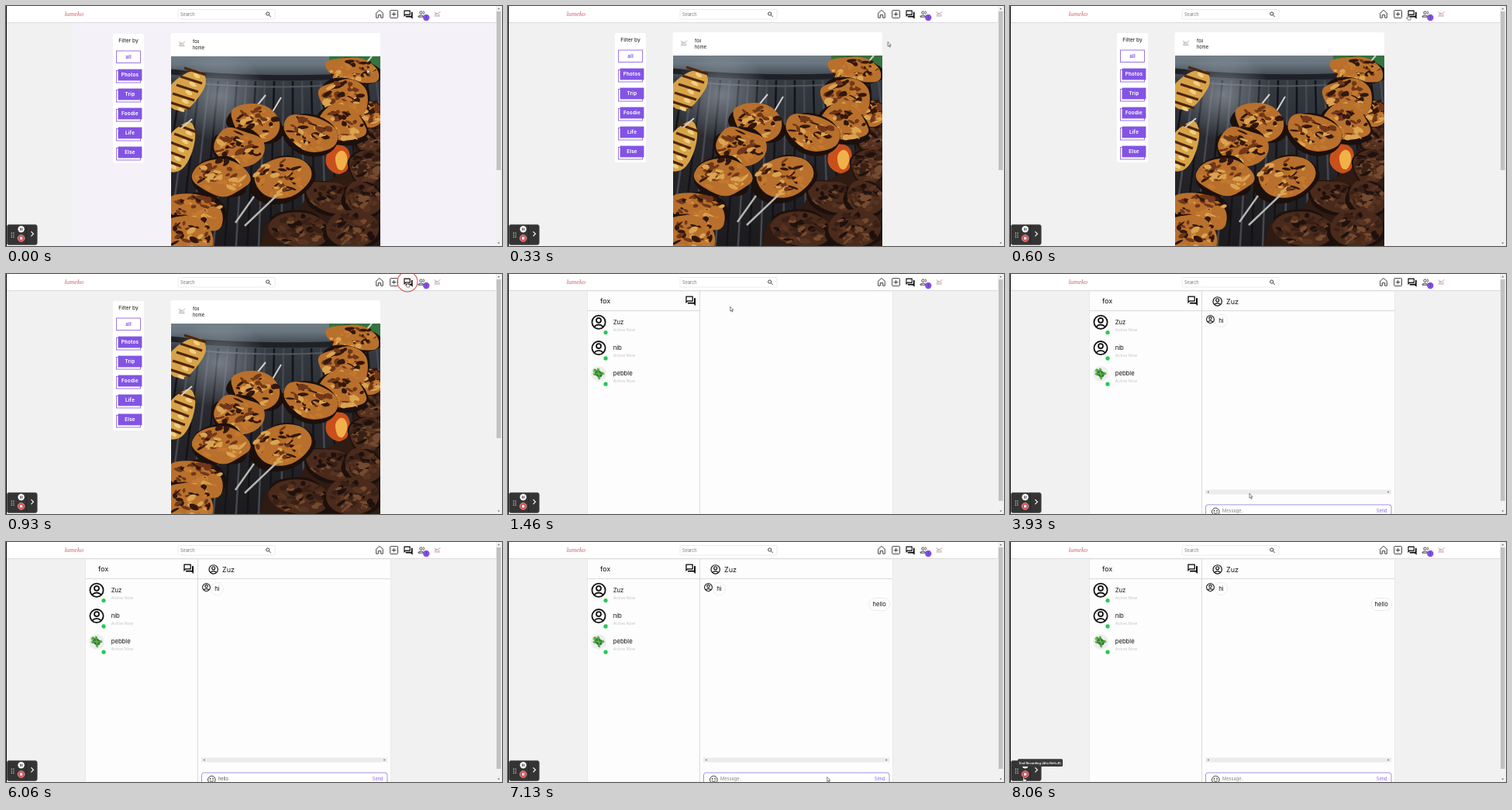
Write an HTML page that moves like this. It is 640x310 px and loops after 8.13 s.

```html
<!DOCTYPE html>
<html lang="en">
<head>
<meta charset="utf-8">
<title>Photo feed and chat</title>
<style>
html, body { margin: 0; width: 100%; height: 100%; overflow: hidden; background: #f1f1f1; }
svg { display: block; width: 640px; height: 310px; }
text { font-family: Inter, "Open Sans", sans-serif; fill: #111; }
.ui { font-family: Roboto, sans-serif; }
.line { fill: none; stroke: #222; stroke-width: .85; }
.b { font-weight: 700; }
</style>
</head>
<body>
<svg id="stage" viewBox="0 0 640 310">
  <defs>
    <linearGradient id="smoke" x1="0" y1="0" x2="0" y2="1">
      <stop offset="0" stop-color="#74828c"/><stop offset=".07" stop-color="#69757f"/>
      <stop offset=".15" stop-color="#353b43"/><stop offset=".5" stop-color="#27272c"/>
      <stop offset="1" stop-color="#1b191c"/>
    </linearGradient>
    <radialGradient id="haze">
      <stop offset="0" stop-color="#b9c3cf" stop-opacity=".5"/>
      <stop offset="1" stop-color="#b9c3cf" stop-opacity="0"/>
    </radialGradient>
    <clipPath id="frame"><rect x="213" y="64" width="270" height="247"/></clipPath>
    <path id="forum" d="M15 4v7H5.2L4 12.2V4h11m1-2H3c-.55 0-1 .45-1 1v14l4-4h10c.55 0 1-.45 1-1V3c0-.55-.45-1-1-1zm5 4h-2v9H6v2c0 .55.45 1 1 1h11l4 4V7c0-.55-.45-1-1-1z"/>
    <g id="person" fill="none" stroke="#111" stroke-width="1.8">
      <circle r="8.6"/><circle cy="-2.5" r="3"/><path d="M-6 6Q0 .5 6 6"/>
    </g>
    <g id="badgePic">
      <path d="M-4-3L0-1.5 4-3.5 3 3H-3z" fill="#f3f0ee"/>
      <path d="M-4-3l2 1.5M4-3.5L2-1.5M-4 2.5h7.5M-2.5-1l4 .2M-3.5 1l2-1" fill="none" stroke="#777" stroke-width=".5"/>
      <circle cx="-1" cy=".5" r=".7" fill="#d9a5a5"/><circle cx="2" cy=".7" r=".7" fill="#d9a5a5"/>
    </g>
  </defs>
  <rect id="tint" x="86" width="546" height="310" fill="#f5f1f8"/>
  <g id="home">
    <rect x="138" y="35" width="40" height="167" rx="2" fill="#fff"/>
    <text x="158" y="46" font-size="6.7" text-anchor="middle">Filter by</text>
    <g id="filters"></g>
    <rect x="212.5" y="34" width="270.5" height="276" rx="2" fill="#fff"/>
    <use href="#badgePic" x="227" y="48"/>
    <text x="241" y="46.5" font-size="5.7">fox</text>
    <text x="241" y="54.5" font-size="5.7">home</text>
    <g clip-path="url(#frame)"><g id="photo" style="filter:blur(.5px)"></g></g>
  </g>
  <g id="chat">
    <rect x="102.5" y="22" width="394" height="288" fill="#fdfdfd" stroke="#e2e2e2" stroke-width=".6"/>
    <path d="M102 47.5H248M247.5 22V310" stroke="#d2d2d2" stroke-width=".8"/>
    <text x="119" y="38" font-size="9">fox</text>
    <use href="#forum" transform="translate(228.1 27.2) scale(.63)"/>
    <g id="friends"></g>
    <g id="pane">
      <path d="M248 47.5H496" stroke="#d2d2d2" stroke-width=".8"/>
      <use href="#person" transform="translate(267.7 35.4) scale(.66)"/>
      <text x="279" y="38.6" font-size="9">Zuz</text>
      <use href="#person" transform="translate(258.5 58.5) scale(.57)"/>
      <rect x="264.5" y="52.5" width="16" height="16" rx="8" fill="#fff" stroke="#e2e2e2" stroke-width=".7"/>
      <text x="272.5" y="63" font-size="7.8" text-anchor="middle">hi</text>
      <g id="reply">
        <rect x="466" y="72.5" width="26.5" height="16" rx="8" fill="#fff" stroke="#e2e2e2" stroke-width=".7"/>
        <text x="479.2" y="83" font-size="7.6" text-anchor="middle">hello</text>
      </g>
      <rect x="252" y="278.5" width="240" height="6" fill="#ececec"/>
      <path d="M254.5 281.5l2-1.5v3zM489.5 281.5l-2-1.5v3z" fill="#777"/>
      <rect x="252.5" y="298" width="239.5" height="20" rx="3" fill="#fff" stroke="#9a87dd" stroke-width=".9"/>
      <g class="line" transform="translate(265.3 307)">
        <circle r="4.8"/><path d="M-2.6 1.2Q0 4 2.6 1.2"/>
        <path d="M-1.8-1.6v.8M1.8-1.6v.8" stroke-linecap="round" stroke-width="1.3"/>
      </g>
      <text id="draft" x="274" y="308.2" font-size="5.7"></text>
      <text x="472.8" y="308.2" font-size="5.7" style="fill:#8466e8">Send</text>
    </g>
  </g>
  <g id="header">
    <rect width="632" height="21" fill="#fff"/>
    <path d="M0 21.5H632" stroke="#dadada"/>
    <text x="75.5" y="13" font-size="8.5" font-style="italic" style="font-family:'Liberation Serif',serif;fill:#c8646c">lumeko</text>
    <rect x="222" y="4.5" width="125" height="12.5" rx="1.5" fill="#fff" stroke="#e6e6e6" stroke-width=".8"/>
    <text x="225" y="12.8" font-size="5.6" style="fill:#777">Search</text>
    <circle cx="337.7" cy="10" r="2.1" class="line"/><path d="M339.3 11.6l2.5 2.5" class="line"/>
    <path d="M477.7 9.2L482 5.4 486.3 9.2V15.2H483.7V11.4H480.3V15.2H477.7z" class="line"/>
    <rect x="495.7" y="5.6" width="9.8" height="9.8" rx="1" class="line"/>
    <path d="M500.6 7.7v5.6M497.8 10.5h5.6" class="line"/>
    <use href="#forum" transform="translate(512.3 4.4) scale(.56)"/>
    <circle cx="535.5" cy="8.6" r="1.7" class="line"/>
    <path d="M532 14.2v-1Q535.5 10.8 539 13.2v1zM538.2 6.7a2 2 0 0 1 0 3.8M540 12.2l1.5 1.5" class="line"/>
    <circle cx="542.3" cy="15" r="4.2" fill="#8250e6"/>
    <text x="542.3" y="16.7" font-size="4.4" text-anchor="middle" style="fill:#3a1f78">1</text>
    <use href="#badgePic" x="556.5" y="10.5"/>
  </g>
  <rect x="632" width="8" height="310" fill="#f1f1f1"/>
  <rect id="thumb" x="633" y="7" width="5.6" fill="#c1c1c1"/>
  <path d="M634.3 4.3h3l-1.5-1.8zM634.3 305.5h3l-1.5 1.8z" fill="#666"/>
  <path d="M.5 0V310" stroke="#111"/>
  <g id="recorder">
    <rect x="1.4" y="282.4" width="38.8" height="26" rx="2.5" fill="#343434" stroke="#555" stroke-width=".7"/>
    <path d="M26.5 283V308" stroke="#222" stroke-width=".7"/>
    <g id="grip" fill="#ddd"></g>
    <circle cx="19.6" cy="288.3" r="4.2" fill="#fff"/>
    <path d="M18.6 286.5v3.6M20.7 286.5v3.6" stroke="#333"/>
    <circle cx="19.6" cy="300" r="4.3" fill="#e0424a" stroke="#f1c4c4" stroke-width=".7"/>
    <rect x="18" y="298.4" width="3.2" height="3.2" fill="#fff"/>
    <path d="M32.4 291.3l3 3-3 3" fill="none" stroke="#fff" stroke-width="1.2"/>
  </g>
  <g id="tip">
    <rect x="10" y="280.3" width="58" height="9.7" rx="1.5" fill="#3a3a3a"/>
    <text class="ui" x="39" y="286.8" font-size="4.3" font-weight="500" text-anchor="middle" style="fill:#fff">End Recording (Alt+Shift+R)</text>
  </g>
  <circle id="ring" r="13" fill="#e88" fill-opacity=".06" stroke="#cf5a5a" stroke-width="1.1"/>
  <g id="cursor" fill="#fff" stroke="#333" stroke-width=".6" stroke-linejoin="round">
    <path id="arrow" d="M0-2.5V3.4L1.4 2.2 2.4 4.4 3.3 4 2.3 1.8H4.1z"/>
    <path id="hand" d="M-1-2.5Q-.3-3.2.3-2.4V.2L2.8.8Q3.4 1 3.2 2L2.7 4H-.6L-2.4 1.4-1 1.5z"/>
    <path id="beam" d="M-1-3H1M0-3V3M-1 3H1"/>
  </g>
</svg>
<script>
const LOOP = 8130, PURPLE = "#8354e4";
const $ = id => document.getElementById(id);
const show = (id, on) => $(id).style.display = on ? "" : "none";

function add(parent, tag, attrs, text) {
  const el = document.createElementNS("http://www.w3.org/2000/svg", tag);
  for (const k in attrs) el.setAttribute(k, attrs[k]);
  if (text) el.textContent = text;
  return parent.appendChild(el);
}

function rng(seed) {
  return () => (seed = (seed * 16807) % 2147483647) / 2147483647;
}

function buildFilters() {
  const g = $("filters");
  const box = (x, y, w, h, fill) => add(g, "rect", { x, y, width: w, height: h, fill, stroke: PURPLE, "stroke-width": .8 });
  ["all", "Photos", "Trip", "Foodie", "Life", "Else"].forEach((name, i) => {
    const y = 57 + i * 25;
    box(142.5, y + (i ? .5 : 0), 31, 15.5, "#fff");
    if (i) box(145, y - 1, 30, 14, PURPLE);
    add(g, "text", {
      x: i ? 160 : 158, y: y + (i ? 8.2 : 10), "font-size": 6.2, class: "b",
      "letter-spacing": .25, "text-anchor": "middle", style: `fill:${i ? "#fff" : PURPLE}`
    }, name);
  });
}

function buildFriends() {
  const g = $("friends");
  ["Zuz", "nib", "pebble"].forEach((name, i) => {
    const y = 62.3 + i * 33.3;
    if (i < 2) add(g, "use", { href: "#person", transform: `translate(117 ${y})` });
    else {
      add(g, "circle", { cx: 117, cy: y, r: 10, fill: "#eeeeee" });
      const a = add(g, "g", { transform: `translate(117 ${y}) rotate(40)` });
      [[-4, -4], [4, -4], [-4, 4], [4, 4]].forEach(([cx, cy]) =>
        add(a, "ellipse", { cx, cy, rx: 2, ry: 1.5, fill: "#63b548" }));
      add(a, "circle", { cx: -6.2, r: 2.6, fill: "#74c455" });
      add(a, "ellipse", { rx: 5.3, ry: 4.2, fill: "#2f8038" });
      add(a, "path", { d: "M-3-2L3 2M-3 2L3-2", stroke: "#85ba4b" });
      add(a, "circle", { cx: -6.8, cy: -.8, r: .6, fill: "#222" });
    }
    add(g, "circle", { cx: 126, cy: y + 13.3, r: 2.6, fill: "#20cc50" });
    add(g, "text", { x: 135.7, y: y + 2.4, "font-size": 7.7 }, name);
    add(g, "text", { x: 135.7, y: y + 11.2, "font-size": 5.3, style: "fill:#c4c4c4" }, "Active Now");
  });
}

function blob(g, rand, x, y, rx, ry, fill, turn = 0) {
  const n = 9, pts = [];
  for (let i = 0; i < n; i++) {
    const a = i / n * Math.PI * 2, k = .86 + rand() * .34;
    pts.push([x + Math.cos(a) * rx * k, y + Math.sin(a) * ry * k]);
  }
  const mid = i => [0, 1].map(j => (pts[i % n][j] + pts[(i + 1) % n][j]) / 2);
  let d = "M" + mid(0);
  for (let i = 1; i <= n; i++) d += "Q" + pts[i % n] + " " + mid(i);
  add(g, "path", { d, fill, transform: `rotate(${turn} ${x} ${y})` });
}

function buildPhoto() {
  const g = $("photo"), rand = rng(71);
  const line = (d, stroke, w) => add(g, "path", { d, stroke, "stroke-width": w, fill: "none" });
  // Char gathers on the upper side, gold on the lower side.
  const piece = (x, y, rx, ry, turn, tones) => {
    blob(g, rand, x, y + 1.5, rx + 1.5, ry + 1.5, "#1c100c", turn);
    blob(g, rand, x, y, rx, ry, tones[0], turn);
    for (let i = 0; i < 46; i++) {
      const a = rand() * 6.28, r = Math.sqrt(rand()) * .8;
      const px = x + Math.cos(a) * rx * r, py = y + Math.sin(a) * ry * r;
      const dark = rand() < .5 - (py - y) / ry * .7;
      blob(g, rand, px, py, 1.5 + rand() * 6, 1 + rand() * 3, tones[(dark ? 1 : 3) + (i % 2)], turn + rand() * 80 - 50);
    }
  };
  const chicken = ["#b8702c", "#32170c", "#71371a", "#dba450", "#c3792f"];
  const beef = ["#4a2a1b", "#1e110d", "#382016", "#754a2e", "#573321"];

  add(g, "rect", { x: 205, y: 56, width: 286, height: 263, fill: "url(#smoke)" });
  for (let i = 0; i < 24; i++) {
    const x = 214 + i * 12;
    line(`M${x} 96L${x - 34 + i * 2.6} 310`, i % 2 ? "#131317" : "#464850", 2.5);
  }
  line("M213 84Q330 97 483 88", "#202127", 7);
  line("M250 99Q340 106 410 102", "#53565e", 2);
  add(g, "rect", { x: 417, y: 60, width: 74, height: 20, fill: "#35733f" });
  add(g, "ellipse", { cx: 275, cy: 115, rx: 62, ry: 58, fill: "url(#haze)" });
  blob(g, rand, 430, 196, 17, 20, "#c9501b");
  blob(g, rand, 433, 198, 8, 12, "#f0b04a");

  [[234, 106, 20, 31, 38], [224, 180, 17, 34, 18]].forEach(([x, y, rx, ry, turn]) => {
    blob(g, rand, x, y, rx, ry, "#d8a348", turn);
    for (let i = -2; i < 3; i++) {
      const cx = x - i * 5, cy = y + i * 11;
      line(`M${cx - rx * .7} ${cy - 5}l${rx * 1.4} 9`, "#4d260d", 3.4);
      blob(g, rand, cx + 2, cy + 5, 5, 2.5, "#f0cf83", 30);
    }
  });

  add(g, "path", { d: "M490 145L450 180 440 212 392 235 380 260 335 280 325 319H490z", fill: "#2f1b12" });
  [
    [470, 168, 20, 21, 20], [466, 206, 24, 22, 0], [420, 247, 34, 20, 20],
    [461, 248, 26, 22, 10], [380, 288, 42, 24, 15], [448, 288, 38, 24, 0]
  ].forEach(p => piece(...p, beef));
  line("M318 135L335 114M336 149L355 117M460 78L472 64M226 157L240 145", "#d0d0cc", 2);
  [
    [449, 82, 38, 17, 8], [470, 138, 18, 17, 0], [436, 118, 33, 25, 5],
    [434, 152, 34, 23, 20], [393, 164, 34, 26, 25], [322, 151, 34, 24, 15],
    [300, 182, 32, 25, 10], [278, 219, 38, 26, 8], [354, 221, 40, 29, -6],
    [247, 264, 38, 25, 15], [232, 295, 40, 25, 10]
  ].forEach(p => piece(...p, chicken));
  line("M320 245L296 279M349 244L308 283", "#b5b5b0", 2.5);
}

// [time, x, y]
const path = [
  [0, 466, 84], [60, 466, 84], [600, 514, 14], [930, 518, 13], [1130, 518, 13],
  [1700, 145, 64], [1950, 145, 64], [2530, 316, 248], [3300, 316, 248],
  [3930, 309, 286], [4250, 305, 305], [6100, 305, 305], [6500, 479, 306],
  [6900, 479, 306], [7860, 18, 306], [LOOP, 18, 306]
];
const clicks = [[900, 518, 10], [1780, 145, 64], [4330, 305, 305], [6560, 479, 306]];

function pointer(t) {
  const i = path.findIndex(p => p[0] > t), a = path[i - 1], b = path[i];
  const u = (t - a[0]) / (b[0] - a[0]), k = u * u * (3 - 2 * u);
  return [a[1] + (b[1] - a[1]) * k, a[2] + (b[2] - a[2]) * k];
}

function draw(t) {
  const onChat = t >= 1130, sent = t >= 6700, settling = t < 60;
  show("home", !onChat);
  show("chat", onChat);
  show("pane", t >= 1870);
  show("reply", sent);
  show("tip", t >= 7930);
  show("tint", settling);
  $("home").setAttribute("transform", settling ? "translate(0 1)" : "");
  $("thumb").setAttribute("height", onChat ? 286 : 205);

  const count = sent ? 0 : Math.max(0, Math.min(5, Math.floor((t - 4700) / 200)));
  $("draft").textContent = count ? "hello".slice(0, count) : "Message..";
  $("draft").style.fill = count ? "#555" : "#858585";

  const [x, y] = pointer(t);
  const hand = (t >= 560 && t < 1150) || (t >= 1650 && t < 1980) || (t >= 6440 && t < 6930) || t >= 7800;
  const beam = t >= 4150 && t < 4500;
  $("cursor").setAttribute("transform", `translate(${x} ${y})`);
  show("cursor", t < 4500 || t >= 6130);
  show("arrow", !hand && !beam);
  show("hand", hand);
  show("beam", beam);

  const hit = clicks.find(c => t >= c[0] && t < c[0] + 220);
  show("ring", hit);
  if (hit) $("ring").setAttribute("transform", `translate(${hit[1]} ${hit[2]})`);
}

buildFilters();
buildFriends();
buildPhoto();
for (let i = 0; i < 6; i++)
  add($("grip"), "circle", { cx: 7.3 + (i % 2) * 2.6, cy: 293.3 + (i >> 1) * 2.6, r: .7 });

const start = performance.now();
function tick() {
  draw((performance.now() - start) % LOOP);
  requestAnimationFrame(tick);
}
tick();
</script>
</body>
</html>
```
